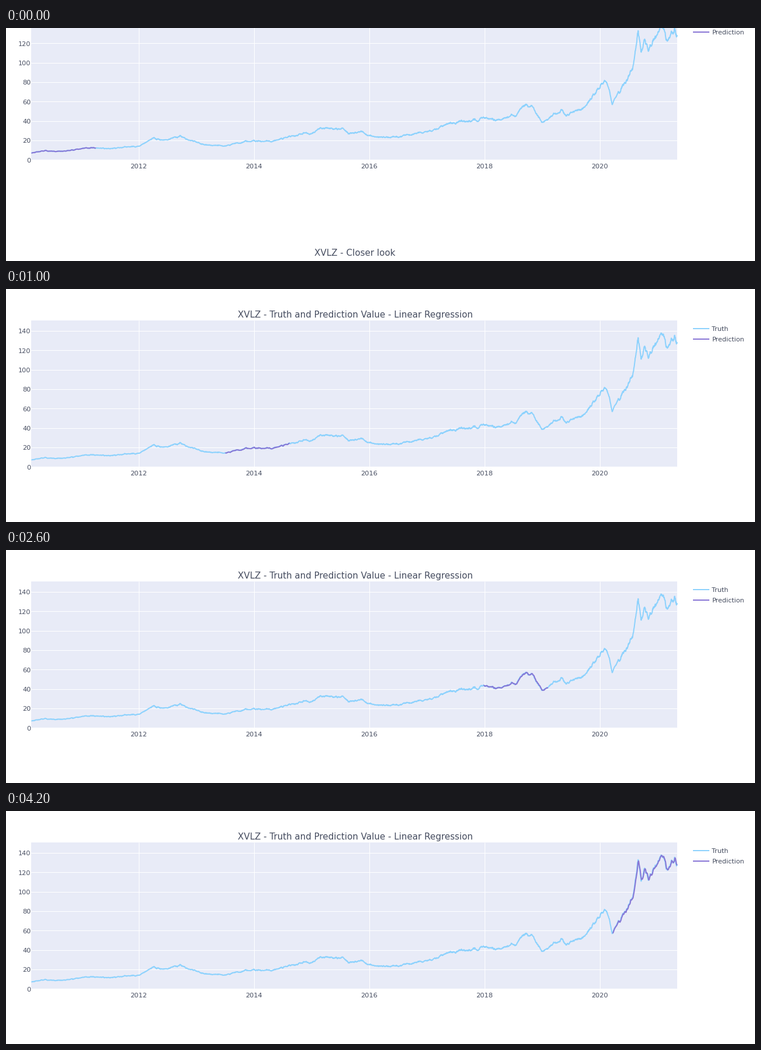
A matplotlib script for the animation above (4300 ms loop, 1280 by 400 pixels).

```python
import matplotlib.pyplot as plt
import numpy as np
from matplotlib.animation import FuncAnimation
from matplotlib.patches import Rectangle

W, H, DPI = 1280, 400, 100
FRAMES, STEP_MS = 43, 100
PX = 72 / DPI                      # points per pixel

LEFT, RIGHT, TOP, BASE = 43, 1147, 54, 305
UNIT = 33.36 / 20                  # pixels per price unit
YEAR = 98.5                        # pixels per year
FOLDS, SAMPLES = 10, 2800
SCROLL = 79                        # page offset before the first step

PANEL, SKY, PURPLE, INK = "#e8ebf7", "#8dd2fd", "#8875d5", "#464d60"
TICKER = "XVLZ"

# Main turning points: year, price
TURNS = [
    (2010.14, 7), (2010.31, 9.2), (2010.65, 8.8), (2011.12, 12.4),
    (2011.46, 11.5), (2012.02, 14.6), (2012.27, 22.3), (2012.38, 19.7),
    (2012.71, 24.5), (2013.1, 16), (2013.5, 14.6), (2013.97, 19.8),
    (2014.3, 18.5), (2014.9, 28.5), (2015.0, 26.5), (2015.14, 32),
    (2015.54, 32), (2015.66, 27.5), (2015.86, 29.3), (2016.07, 23.8),
    (2016.49, 23.5), (2017.03, 29.5), (2017.4, 37.5), (2018.05, 43),
    (2018.3, 41.5), (2018.56, 47), (2018.67, 56), (2018.82, 55),
    (2019.01, 37), (2019.33, 51.5), (2019.42, 45.5), (2019.75, 55),
    (2020.04, 80), (2020.13, 80), (2020.22, 58), (2020.57, 95),
    (2020.67, 131), (2020.72, 109), (2020.78, 121), (2020.84, 111),
    (2021.07, 141), (2021.18, 119), (2021.3, 134), (2021.35, 128),
]


def year_x(year):
    return 226.5 + (year - 2012) * YEAR


def price_y(price):
    return BASE + 0.5 - price * UNIT


def wander(n, keep=0.92):
    """Seeded noise of unit spread that drifts back to zero."""
    rng = np.random.default_rng(12)
    noise = np.zeros(n)
    shocks = rng.normal(0, np.sqrt(1 - keep ** 2), n)
    for i in range(1, n):
        noise[i] = keep * noise[i - 1] + shocks[i]
    return noise


def price_curve():
    years, prices = zip(*TURNS)
    x = np.linspace(LEFT + 0.5, RIGHT, SAMPLES)
    trend = np.interp(x, [year_x(t) for t in years], prices)
    return x, price_y(trend + wander(SAMPLES) * (0.12 + 0.018 * trend))


def lagged_mean(y, n=3):
    padded = np.concatenate([np.full(n, y[0]), y])
    return np.convolve(padded, np.ones(n) / n, "valid")[:len(y)]


fig = plt.figure(figsize=(W / DPI, H / DPI), dpi=DPI, facecolor="white")
ax = fig.add_axes([0, 0, 1, 1])
ax.set_xlim(0, W)
ax.axis("off")


def label(x, y, text, size, ha="left"):
    ax.text(x, y, text, fontsize=size * PX, color=INK, ha=ha,
            va="baseline", family="DejaVu Sans")


def stroke(x, y, color, width=2.0, z=3):
    return ax.plot(x, y, color=color, lw=width * PX, zorder=z,
                   solid_capstyle="butt", solid_joinstyle="round")[0]


ax.add_patch(Rectangle((LEFT, TOP), RIGHT - LEFT, BASE - TOP,
                       facecolor=PANEL, linewidth=0, zorder=0))

for price in range(0, 141, 20):
    y = price_y(price)
    if price:
        stroke([LEFT, RIGHT], [y, y], "white", 1, 1)
    label(42.5, y + 4.3, str(price), 11.3, "right")

for year in range(2012, 2021, 2):
    x = year_x(year)
    stroke([x, x], [TOP, BASE], "white", 1, 1)
    label(x, 319.6, str(year), 11.4, "center")

label(596.5, 48.8, f"{TICKER} - Truth and Prediction Value - Linear Regression",
      15.1, "center")
label(596, 470, f"{TICKER} - Closer look", 15.1, "center")

for name, color, y in (("Truth", SKY, 68), ("Prediction", PURPLE, 85.5)):
    stroke([1174, 1202], [y, y], color)
    label(1206.5, y + 4.2, name, 11.1)

xs, truth = price_curve()
guess = lagged_mean(truth)
stroke(xs, truth, SKY)
predicted = stroke([], [], PURPLE, z=4)

# Folds advance at an even pace, then the last one holds
STARTS = [round(1 + 3.875 * k) for k in range(FOLDS - 1)]


def draw(frame):
    fold = sum(frame >= s for s in STARTS)
    size = SAMPLES // FOLDS
    part = slice(fold * size, (fold + 1) * size)
    predicted.set_data(xs[part], guess[part])
    top = SCROLL if frame < STARTS[0] else 0
    ax.set_ylim(top + H, top)
    return [predicted]


anim = FuncAnimation(fig, draw, frames=FRAMES, interval=STEP_MS,
                     repeat=True, repeat_delay=0, blit=False)
plt.show()
```
